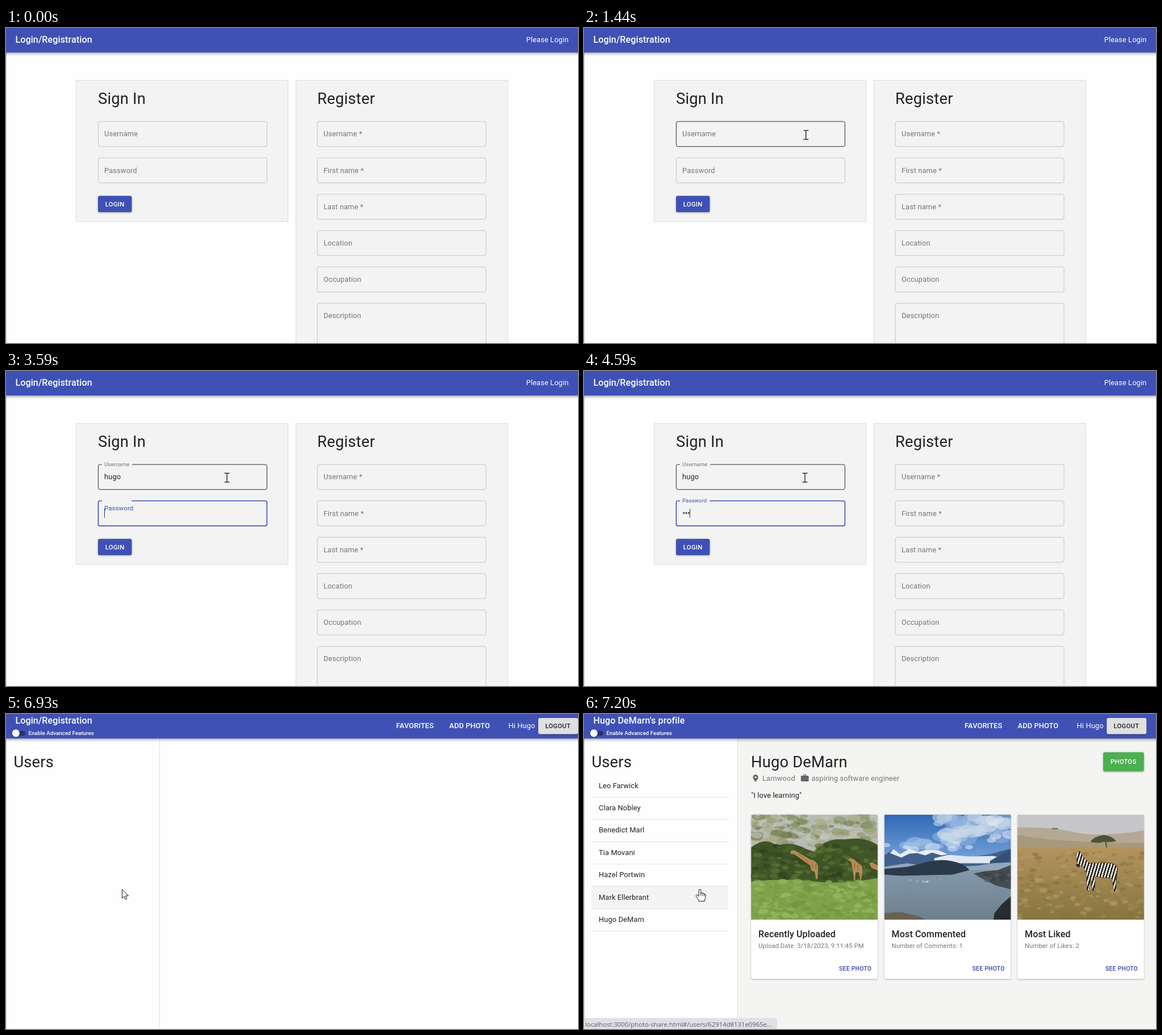
Animation, 1007 px wide and 556 px high, one loop 8000 ms. Source, as an HTML page:

```html
<!DOCTYPE html>
<html lang="en">
<head>
<meta charset="utf-8">
<title>Login</title>
<style>
  html, body { margin: 0; width: 100%; height: 100%; overflow: hidden; background: #fefefe; }
  svg { display: block; }
  text { font: 400 12.84px Roboto, sans-serif; letter-spacing: .12px; fill: #212121; white-space: pre; }
  .h4 { font-size: 27.3px; letter-spacing: .2px; }
  .h6 { font-size: 16.05px; font-weight: 500; }
  .btn { font-size: 11.23px; font-weight: 500; letter-spacing: .32px; }
  .small { font-size: 10.43px; font-weight: 500; letter-spacing: .25px; fill: #3545a8; }
  .body2 { font-size: 11.23px; }
  .caption { font-size: 9.63px; font-weight: 500; letter-spacing: .05px; }
  .url { font: 11.3px "Open Sans", sans-serif; letter-spacing: 0; fill: #5a5d61; }
  .medium { font-weight: 500; }
  .white { fill: #fff; }
  .grey { fill: #757575; }
  .bar { filter: drop-shadow(0 2px 2.5px rgba(0,0,0,.38)); }
  .raised { filter: drop-shadow(0 1.5px 1.5px rgba(0,0,0,.32)); }
  .card { filter: drop-shadow(0 1px 1px rgba(0,0,0,.3)); }
</style>
</head>
<body>
<svg id="stage" width="1007" height="556" viewBox="0 0 1007 556"></svg>
<script>
const LOOP = 8000, BLUE = '#3f51b5', ROW = 64.2, FIELD_W = 297, FIELD_H = 44.2;
const USER = 'hugo', NAME = 'Hugo DeMarn';
const PEOPLE = ['Leo Farwick', 'Clara Nobley', 'Benedict Marl', 'Tia Movani', 'Hazel Portwin', 'Mark Ellerbrant', NAME];

const text = (x, y, s, cls = '', extra = '') => `<text x="${x}" y="${y}" class="${cls}" ${extra}>${s}</text>`;
const rect = (x, y, w, h, fill, extra = '') => `<rect x="${x}" y="${y}" width="${w}" height="${h}" fill="${fill}" ${extra}/>`;
const path = (d, fill, extra = '') => `<path d="${d}" fill="${fill}" ${extra}/>`;
const line = (d, color, width) => path(d, 'none', `stroke="${color}" stroke-width="${width}" stroke-linecap="round"`);
const group = (id, body) => `<g id="${id}">${body}</g>`;

// Rounded outline with an optional gap for the floating label
function outline(x, y, h, gapStart, gapEnd) {
  const r = 3.2, w = FIELD_W;
  return `M${gapEnd} ${y}H${x + w - r}a${r} ${r} 0 0 1 ${r} ${r}V${y + h - r}a${r} ${r} 0 0 1 ${-r} ${r}` +
    `H${x + r}a${r} ${r} 0 0 1 ${-r} ${-r}V${y + r}a${r} ${r} 0 0 1 ${r} ${-r}H${gapStart}`;
}

function field(x, i, label, id = '') {
  const y = 165 + ROW * i, h = label === 'Description' ? 100 : FIELD_H;
  return path(outline(x, y, h, x + 20, x + 20), 'none', `id="${id}Box" stroke="#c1c1c1" stroke-width=".95"`) +
    text(0, 0, label, 'grey', `id="${id}Label" transform="translate(${x + 11} ${y + 26.4})"`);
}

function loginPage() {
  const panel = (x, h) => rect(x, 92.4, 373, h, '#f3f3f3', 'stroke="#d9d9d9" stroke-width=".9"');
  const labels = ['Username *', 'First name *', 'Last name *', 'Location', 'Occupation', 'Description'];
  return panel(123.6, 249.2) + panel(510.3, 520) +
    text(162, 134.3, 'Sign In', 'h4') + text(548, 134.3, 'Register', 'h4') +
    field(162.4, 0, 'Username', 'user') + field(162.4, 1, 'Password', 'pass') +
    labels.map((s, i) => field(548, i, s, 'reg' + i)).join('') +
    text(173, 191.4, '', '', 'id="value"') +
    group('dots', [0, 1, 2, 3].map(i => `<circle cx="${175.7 + 4.35 * i}" cy="250.8" r="1.45" fill="#222"/>`).join('')) +
    rect(0, 0, .9, 16, '#222', 'id="caret"') +
    rect(162, 296.3, 59.4, 28.8, BLUE, 'id="login" rx="3.2" class="raised"') +
    `<clipPath id="loginClip">${rect(162, 296.3, 59.4, 28.8, '#fff', 'rx="3.2"')}</clipPath>` +
    '<g clip-path="url(#loginClip)"><circle id="ripple" cx="204" cy="309" fill="#fff"/></g>' +
    text(174.8, 314.7, 'LOGIN', 'btn white');
}

// Seeded flecks for foliage and grass
let seed = 7;
const rnd = () => (seed = seed * 16807 % 2147483647) / 2147483647;
function flecks(n, x, y, w, h, size, colors) {
  let s = '';
  for (let i = 0; i < n; i++) {
    const r = size * (.5 + rnd());
    s += `<ellipse cx="${(x + rnd() * w).toFixed(1)}" cy="${(y + rnd() * h).toFixed(1)}" rx="${r.toFixed(1)}" ` +
      `ry="${(r * .55).toFixed(1)}" fill="${colors[Math.floor(rnd() * colors.length)]}" opacity=".6"/>`;
  }
  return s;
}

function giraffePhoto() {
  const tan = '#b98a55';
  return rect(0, 0, 223, 186, '#b5bbb0') +
    flecks(150, 0, 0, 223, 52, 8, ['#8d946a', '#727b4e', '#a9a983', '#c4c8c4']) +
    path('M0 58Q25 38 45 55Q70 46 95 60L112 66Q130 40 165 44Q200 38 223 54V125H0Z', '#3f5527') +
    flecks(170, 0, 55, 223, 60, 6, ['#2c401b', '#4f6a2d', '#5f7a35', '#384d22']) +
    path('M0 118Q60 112 110 118T223 112V186H0Z', '#7fa34a') +
    flecks(190, 0, 118, 223, 68, 6, ['#6d9440', '#8fb25a', '#9cbc68', '#769a45']) +
    path('M70 64L76 63 104 79Q117 82 118 94L117 114H114L112 101 106 99 104 90 76 70 69 69Z', tan) +
    path('M169 80L175 77 181 79 190 87Q196 89 196 98L194 115H192L190 102 184 102 183 116H181L179 98 176 83Z', tan) +
    path('M208 86L213 84 223 90V99L212 94Z', tan) +
    line('M82 69L101 83M108 86v9M114 88v9M182 86v9M188 90v8', '#7d5730', .9);
}

function lakePhoto() {
  return rect(0, 0, 223, 90, 'url(#sky)') +
    flecks(42, 95, 4, 128, 42, 15, ['#dbe5f1', '#c4d5ea', '#8eb0dc']) +
    flecks(18, 0, 48, 150, 14, 12, ['#d9e5f3', '#9fc0e6']) +
    path('M0 72L16 61 28 70 44 60 60 66 74 62 96 63 118 72 146 76 166 73 186 70 222 60V98H0Z', '#41608c') +
    path('M10 68L16 61 28 70 44 60 60 66 74 62 96 63 112 70 100 72 84 67 72 72 58 68 44 69 30 76Z', '#e6edf5') +
    path('M88 77L112 71 150 74 190 73 222 78V86H88Z', '#dfe9f3') +
    path('M186 82L206 70 223 62V88H186Z', '#345173') +
    rect(0, 93, 223, 93, 'url(#water)') +
    path('M0 92L40 86 100 94 165 90 190 86 223 84V98H0Z', '#8fa7bb') +
    path('M0 96L42 92 78 83Q100 78 118 82Q140 86 150 98L120 106 30 108 0 106Z', '#2b3a4b') +
    path('M157 104L178 100 200 98 223 89V132L196 125 172 113Z', '#454b51') +
    path('M223 144L207 158 194 174 192 186H223Z', '#292c2f') +
    path('M0 174L28 172 60 179 74 186H0Z', '#6b6150') +
    flecks(22, 170, 101, 52, 18, 4, ['#5e6062', '#373e45']) +
    flecks(8, 30, 113, 75, 6, 2, ['#d5e2ea']);
}

function zebraPhoto() {
  return rect(0, 0, 223, 186, 'url(#haze)') +
    path('M0 23Q60 21 100 31T223 28V75H0Z', '#b5a995') +
    path('M0 36Q80 50 223 50V75H0Z', '#a7997c') +
    rect(0, 57, 223, 129, 'url(#savanna)') +
    flecks(190, 0, 66, 223, 120, 5, ['#b99a63', '#927b48', '#a68b53', '#80733f']) +
    path('M128 48Q136 38 152 36Q168 38 174 47Q160 50 152 48Q142 52 128 48Z', '#4d5238') +
    line('M155 48L157 57', '#4b4532', 1.8) + line('M62 25h8', '#7d7c6c', 3) +
    path('M103 72L106 66 110 65 117 76 127 86 158 85Q174 85 176 96L173 111 174 136H170L166 112Q149 112 137 109L136 135H132L129 110 126 134H122L121 103 115 90 107 92 105 85Z', 'url(#stripes)', 'stroke="#3b352d" stroke-width=".6"') +
    line('M105 89l3 2', '#2f2a26', 4) + line('M176 95L174 115', '#4b4334', 1.5);
}

const gradient = (id, a, b) => `<linearGradient id="${id}" x2="0" y2="1"><stop stop-color="${a}"/><stop offset="1" stop-color="${b}"/></linearGradient>`;
const defs = '<defs>' + gradient('sky', '#2f68b4', '#7fa9dc') + gradient('water', '#8499ab', '#6c808d') +
  gradient('haze', '#c5c5c9', '#cfcdca') + gradient('savanna', '#b5935d', '#85753f') +
  '<linearGradient id="stripes" gradientUnits="userSpaceOnUse" x1="0" y1="0" x2="5" y2="1.5" spreadMethod="repeat">' +
  '<stop stop-color="#eee9df"/><stop offset=".5" stop-color="#eee9df"/><stop offset=".5" stop-color="#26231f"/><stop offset="1" stop-color="#26231f"/></linearGradient></defs>';

function card(x, title, detail) {
  return rect(x, 177.5, 222.7, 290.2, '#fff', 'rx="3.2" class="card"') +
    text(x + 12.9, 394, title, 'h6') + text(x + 12.9, 413.4, detail, 'body2 grey') +
    text(x + 154.8, 453, 'SEE PHOTO', 'small');
}

function profilePage() {
  const xs = [294.2, 528.7, 763.1];
  const photos = [giraffePhoto, lakePhoto, zebraPhoto];
  return rect(271, 43, 736, 513, '#f4f4f3') +
    rect(13, 304, 241, 39, '#f4f4f4', 'id="hover"') +
    PEOPLE.map((s, i) => text(26, 130.6 + 39.4 * i, s) + rect(13, 146.5 + 39.3 * i, 241, 1, '#dedede')).join('') +
    text(294, 93.6, NAME, 'h4') +
    path('M302 107a4.6 4.6 0 0 0-4.6 4.6C297.4 115 302 120 302 120s4.6-5 4.6-8.4A4.6 4.6 0 0 0 302 107Zm0 3a1.6 1.6 0 1 1 0 3.2a1.6 1.6 0 0 1 0-3.2Z', '#666') +
    text(314, 118.4, 'Larnwood', 'grey') +
    path('M386 109v-1.4q0-1.2 1.2-1.2h3q1.2 0 1.2 1.2V109h3q1.2 0 1.2 1.2v7.6q0 1.2-1.2 1.2H383q-1.2 0-1.2-1.2v-7.6q0-1.2 1.2-1.2Zm1.4 0h2.7v-1.2h-2.7Z', '#666', 'fill-rule="evenodd"') +
    text(400.5, 118.4, 'aspiring software engineer', 'grey') + text(294.2, 148, '"I love learning"') +
    rect(914, 67.6, 71.7, 33.6, '#4caf50', 'rx="3.2" class="raised"') + text(927, 88, 'PHOTOS', 'btn white') +
    card(xs[0], 'Recently Uploaded', 'Upload Date: 3/18/2023, 9:11:45 PM') +
    card(xs[1], 'Most Commented', 'Number of Comments: 1') + card(xs[2], 'Most Liked', 'Number of Likes: 2') +
    group('photos', photos.map((p, i) => `<svg x="${xs[i]}" y="177.5" width="222.7" height="185.6">${p()}</svg>`).join(''));
}

const homePage = text(13.4, 93.6, 'Users', 'h4') + rect(270, 43, 1, 513, '#e0e0e0');

const homeBar = rect(10.5, 29.8, 23.5, 8.4, '#26316f', 'rx="4.2"') +
  '<circle cx="17.4" cy="33.8" r="6.6" fill="#fafafa" class="card"/>' +
  text(39.4, 37.2, 'Enable Advanced Features', 'caption white') +
  group('menu', text(686.8, 25.2, 'FAVORITES', 'medium white') + text(780.3, 25.2, 'ADD PHOTO', 'medium white') +
    text(884.4, 24.8, 'Hi Hugo', 'white') +
    rect(937, 7, 70, 28.4, '#e0e0e0', 'rx="3.2" class="raised"') + text(949.2, 24.9, 'LOGOUT', 'btn'));

const pointer = 'fill="#fff" stroke="#111" stroke-width="1" stroke-linejoin="round"';
const cursors =
  group('arrow', `<path d="M.4 .6V16.3L4 12.9 6.3 18.2 8.8 17.1 6.5 11.9H11.6Z" ${pointer}/>`) +
  group('ibeam', line('M-4 -7.6H-1.2Q0 -7.6 0 -6.6V7.2Q0 8.2 -1.2 8.2H-4M4 -7.6H1.2Q0 -7.6 0 -6.6M0 7.2Q0 8.2 1.2 8.2H4', '#111', 1.3)) +
  group('hand', `<path d="M-1.8 2.2Q-1.8 .5 0 .5T1.8 2.2V8Q1.9 6.3 3.4 6.4 5 6.6 5 8.6 5.2 7.2 6.5 7.4 8 7.6 8 9.4 8.3 8.6 9.3 8.9 10 9.2 10 10.6V14.4Q10 17 8.2 19V21.4H-2V19.4L-6.4 13.3Q-7.5 11.2 -6 10.4 -4.6 9.9 -3.1 11.6L-1.8 13Z" ${pointer}/>` +
    line('M1.8 8v4M5 8.6v3.6M8 9.4v3', '#111', .8));

document.getElementById('stage').innerHTML = defs + rect(0, 0, 1007, 556, '#fefefe') +
  group('loginPage', loginPage()) + group('home', homePage + group('profile', profilePage())) +
  rect(0, 43, 1, 513, '#cbcbcb') + rect(-10, -10, 1027, 53.2, BLUE, 'class="bar"') +
  text(16.4, 26.2, '', 'h6 white', 'id="title"') + text(915.7, 24.8, 'Please Login', 'white', 'id="please"') +
  group('homeBar', homeBar) +
  group('status', path('M0 536.5H337q3 0 3 3V556H0Z', '#dee1e6') +
    text(2, 551.6, 'localhost:3000/photo-share.html#/users/62914d8131e0965e...', 'url')) +
  group('cursor', cursors);

const el = id => document.getElementById(id);
const set = (id, attrs) => { for (const k in attrs) el(id).setAttribute(k, attrs[k]); };
const show = (id, on) => el(id).style.display = on ? '' : 'none';
const unit = v => Math.min(1, Math.max(0, v));
const countPast = (t, times) => times.filter(v => t >= v).length;
const within = (t, a, b) => t >= a && t < b;

// time, x, y
const TRACK = [
  [394, 934, 541], [500, 860, 483], [610, 765, 403], [700, 685, 338], [790, 580, 274], [870, 506, 238],
  [1000, 450, 211], [1142, 420, 197], [1230, 410, 193], [1430, 389, 188], [5560, 389, 188], [5700, 353, 212],
  [5800, 308, 244], [5900, 255, 279], [6000, 219, 300], [6090, 208, 306], [6290, 204, 309], [LOOP, 204, 309]
];
function cursorAt(t) {
  t = 54 + 68 * Math.floor((t - 54) / 68);
  const i = Math.max(1, TRACK.findIndex(k => k[0] > t));
  const [a, b] = [TRACK[i - 1], TRACK[i]], u = unit((t - a[0]) / (b[0] - a[0]));
  return [a[1] + (b[1] - a[1]) * u, a[2] + (b[2] - a[2]) * u];
}

function drawField(id, row, t, start, gapEnd, focused, hovered) {
  const f = 1 - (1 - unit((t - start + 40) / 240)) ** 3, on = t >= start;
  const y = 165 + ROW * row, s = on ? 1 - .25 * f : 1;
  set(id + 'Label', { transform: `translate(173 ${y + 26.4 - (on ? 23.2 * f : 0)}) scale(${s})` });
  el(id + 'Label').style.fill = focused ? BLUE : '';
  set(id + 'Box', {
    d: outline(162.4, y, FIELD_H, on ? 169 : 180, on ? gapEnd : 180),
    stroke: focused ? BLUE : hovered ? '#212121' : '#c1c1c1', 'stroke-width': focused ? 1.6 : .95
  });
}

function render(t) {
  const isHome = t >= 6860, isProfile = t >= 6990;
  const [x, y] = cursorAt(t);
  const inRow = row => within(x, 162, 460) && within(y, 165 + ROW * row, 209 + ROW * row);
  const overLogin = within(x, 162, 221) && within(y, 296, 325);

  show('loginPage', !isHome);
  show('please', !isHome);
  show('home', isHome);
  show('homeBar', isHome);
  show('profile', isProfile);
  show('photos', t >= 7060);
  show('hover', t >= 7130);
  show('status', t >= 7200);
  el('title').textContent = isProfile ? NAME + "'s profile" : 'Login/Registration';
  set('title', { y: isHome ? 17 : 26.2 });
  set('menu', { transform: `translate(${isProfile ? -16.8 : 0} 0)` });

  drawField('user', 0, t, 1840, 222, within(t, 1840, 3590), inRow(0));
  drawField('pass', 1, t, 3590, 221, t >= 3590, inRow(1));
  const typed = countPast(t, [2910, 2980, 3130, 3260]), dots = countPast(t, [4330, 4460, 4590, 4860]);
  el('value').textContent = USER.slice(0, typed);
  [...el('dots').children].forEach((d, i) => d.style.display = i < dots ? '' : 'none');
  const inPass = t >= 3590;
  // the caret toggles at each of these times
  show('caret', countPast(t, [1840, 2450, 2910, 4130, 4330, 5340, 5940, 6450]) % 2);
  const typedW = typed && !isHome ? el('value').getComputedTextLength() : 0;
  set('caret', { x: 173 + (inPass ? dots * 4.35 : typedW), y: inPass ? 243 : 179 });

  const tint = unit((t - 6060) / 250), mix = (a, b) => Math.round(a + (b - a) * tint);
  set('login', { fill: `rgb(${mix(63, 48)},${mix(81, 63)},${mix(181, 159)})` });
  const wave = unit((t - 6640) / 400);
  set('ripple', { r: 46 * Math.sqrt(wave), opacity: t >= 6650 ? .3 : 0 });

  const kind = isHome ? (t >= 7130 ? 'hand' : 'arrow') : overLogin ? 'hand' : inRow(0) || inRow(1) ? 'ibeam' : 'arrow';
  for (const k of ['arrow', 'ibeam', 'hand']) show(k, k === kind);
  show('cursor', t >= 410);
  set('cursor', { transform: `translate(${x} ${y})` });
}

const start = performance.now();
function tick() {
  render((performance.now() - start) % LOOP);
  requestAnimationFrame(tick);
}
tick();
</script>
</body>
</html>
```
